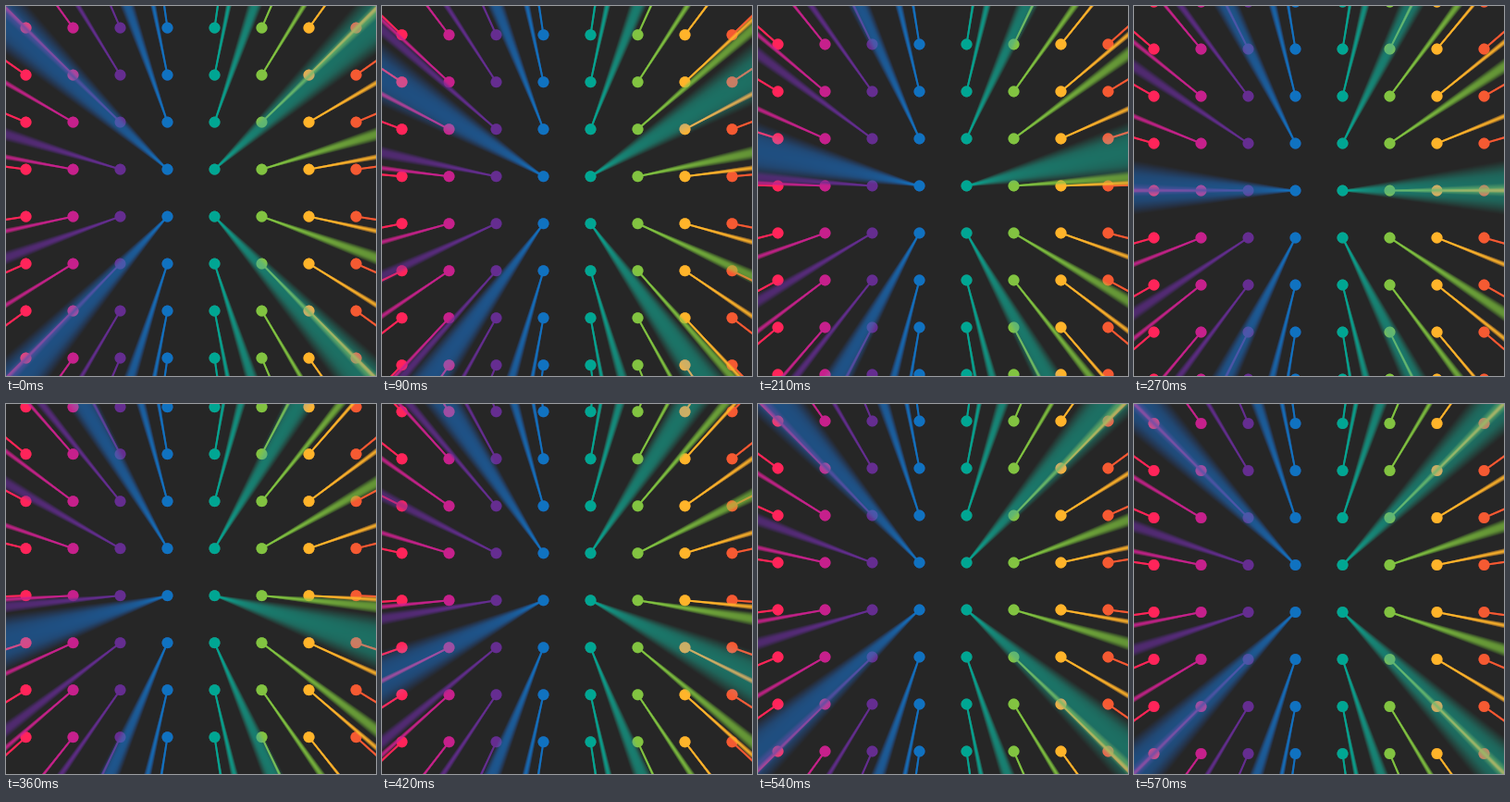
An HTML page with a canvas that plays this animation: 400 by 400 pixels, repeating every 0.6 s.

```html
<!DOCTYPE html>
<html lang="en">
<head>
<meta charset="utf-8">
<title>Focused rods</title>
<style>
  html, body { margin: 0; width: 100%; height: 100%; overflow: hidden; background: #262626; }
  canvas { display: block; width: 400px; height: 400px; }
</style>
</head>
<body>
<canvas id="stage" width="400" height="400"></canvas>
<script>
const SIZE = 400, MID = SIZE / 2;
const LOOP = 600, GAP = 51, FIRST_ROW = -227.5;
const DOT = 5.9;       // dot radius
const ROD = 0.9;       // rod half width at its dot
const LENS = 3.4;      // blur radius gained per unit of magnification
const SOFT = 0.55;     // smallest blur, smooths the edges

const toLinear = v => v <= 0.04045 ? v / 12.92 : ((v + 0.055) / 1.055) ** 2.4;
const toSrgb = v => v <= 0.0031308 ? v * 12.92 : 1.055 * v ** (1 / 2.4) - 0.055;
const parse = hex => [1, 3, 5].map(i => toLinear(parseInt(hex.slice(i, i + 2), 16) / 255));

const ground = parse('#262626');
const colors = ['#ff245a', '#c6208c', '#652d90', '#1072c0',
                '#00a693', '#82c341', '#ffb42a', '#f55a32'].map(parse);

const ctx = document.getElementById('stage').getContext('2d');
const image = ctx.createImageData(SIZE, SIZE);
const light = new Float32Array(SIZE * SIZE * 3);
const levels = Uint8Array.from({ length: 4096 }, (_, i) => Math.round(255 * toSrgb(i / 4095)));

// Mix a colour into one pixel in linear light.
function blend(x, y, color, alpha) {
  if (x < 0 || y < 0 || x >= SIZE || y >= SIZE) return;
  const i = (y * SIZE + x) * 3;
  for (let c = 0; c < 3; c++) light[i + c] += (color[c] - light[i + c]) * alpha;
}

// Share of a round lens lying left of x, for x in units of its radius.
function lensShare(x) {
  if (x <= -1) return 0;
  if (x >= 1) return 1;
  return 0.5 + (x * Math.sqrt(1 - x * x) + Math.asin(x)) / Math.PI;
}

function drawDot({ x, y, color }) {
  const cx = MID + x, cy = MID + y, reach = DOT + 1;
  for (let py = Math.floor(cy - reach); py <= cy + reach; py++) {
    for (let px = Math.floor(cx - reach); px <= cx + reach; px++) {
      const alpha = DOT + 0.5 - Math.hypot(px + 0.5 - cx, py + 0.5 - cy);
      if (alpha > 0) blend(px, py, color, Math.min(1, alpha));
    }
  }
}

// A rod runs from its dot towards the viewer, so it spreads away from the centre.
function drawRod({ x, y, r, color }) {
  const ux = x / r, uy = y / r;
  const flat = Math.abs(ux) > Math.abs(uy);
  const main = flat ? x : y, side = flat ? y : x;
  const step = Math.sign(main), tilt = Math.abs(flat ? ux : uy);

  for (let m = Math.floor(MID + main); m >= 0 && m < SIZE; m += step) {
    const a = m + 0.5 - MID;
    const scale = Math.max(1, a / main);
    const reach = 1.5 + 1.35 * (LENS * (scale - 1) + ROD * scale) / tilt;
    const axis = MID + side * scale;
    const last = Math.min(SIZE - 1, axis + reach);
    for (let n = Math.max(0, Math.floor(axis - reach)); n <= last; n++) {
      const b = n + 0.5 - MID;
      const dx = flat ? a : b, dy = flat ? b : a;
      const s = (dx * ux + dy * uy) / r;
      if (s < 1) continue;
      const off = dx * uy - dy * ux;
      const blur = Math.max(SOFT, LENS * (s - 1)), half = ROD * s;
      const alpha = lensShare((off + half) / blur) - lensShare((off - half) / blur);
      if (alpha > 0) blend(flat ? m : n, flat ? n : m, color, alpha);
    }
  }
}

function render(time) {
  const shift = GAP * (time % LOOP) / LOOP;
  const dots = [];
  for (let row = 0; row < 9; row++) {
    colors.forEach((color, col) => {
      const x = (col - 3.5) * GAP, y = FIRST_ROW + row * GAP + shift;
      dots.push({ x, y, r: Math.hypot(x, y), color });
    });
  }
  dots.sort((a, b) => b.r - a.r);

  for (let i = 0; i < light.length; i++) light[i] = ground[i % 3];
  dots.forEach(drawDot);
  dots.forEach(drawRod);

  const out = image.data;
  for (let i = 0, j = 0; i < light.length; i += 3, j += 4) {
    for (let c = 0; c < 3; c++) out[j + c] = levels[Math.round(light[i + c] * 4095)];
    out[j + 3] = 255;
  }
  ctx.putImageData(image, 0, 0);
}

const start = performance.now();
function tick() {
  render(performance.now() - start);
  requestAnimationFrame(tick);
}
tick();
</script>
</body>
</html>
```
